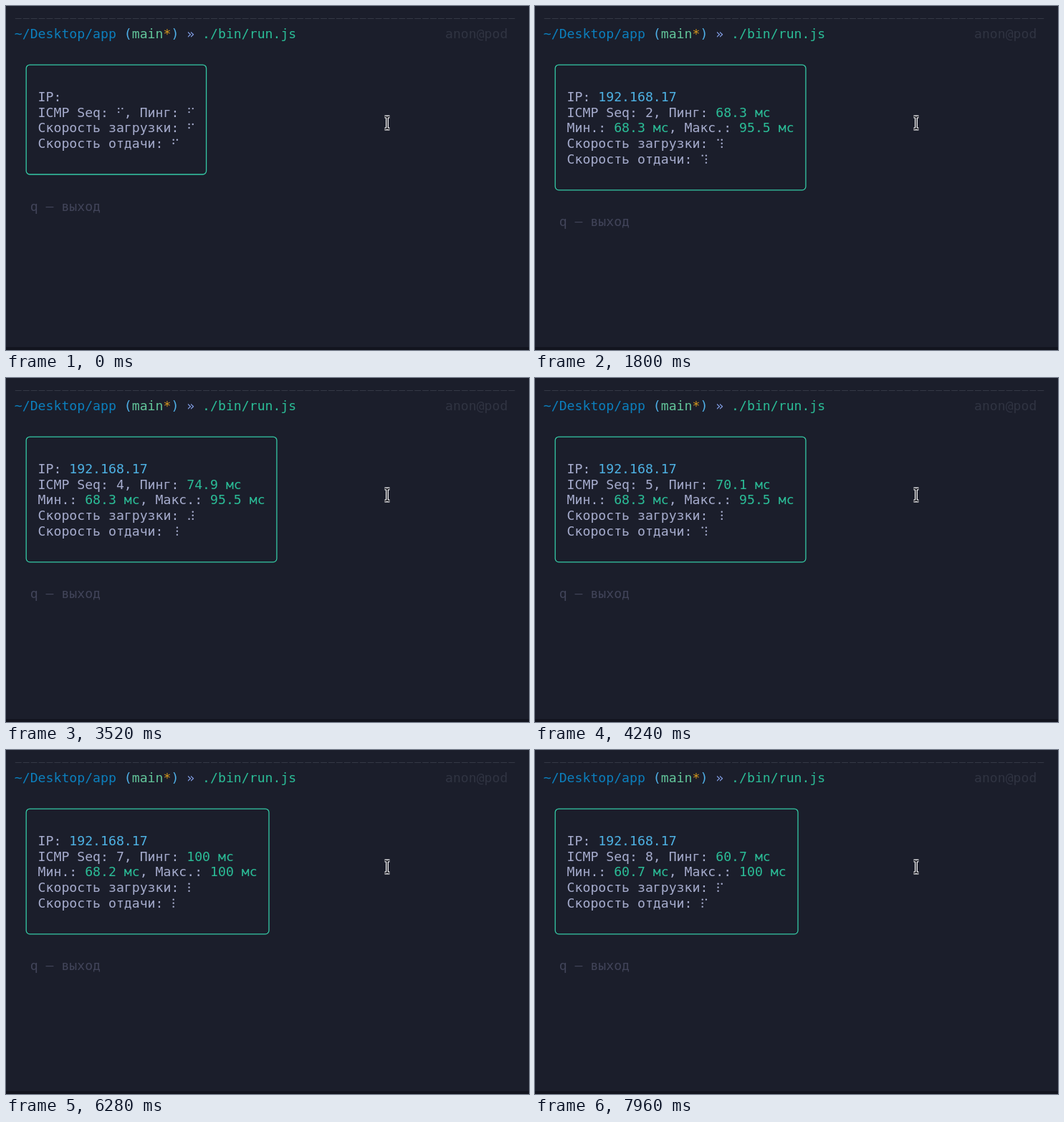
These frames come from a looping animation (730x480 px, 8000 ms). An HTML page with a canvas:

```html
<!DOCTYPE html>
<html lang="ru">
<head>
<meta charset="utf-8">
<title>Terminal network check</title>
<style>
  html, body { margin: 0; width: 100%; height: 100%; overflow: hidden; background: #1b1e2b; }
  canvas { display: block; }
</style>
</head>
<body>
<canvas id="stage" width="730" height="480"></canvas>
<script>
const ctx = document.getElementById('stage').getContext('2d');

const LOOP = 8000;
const CELL = 10.93, LINE = 21.85, LEFT = 11.8, TOP = 17.2;
const SPINNER = '⠋⠙⠹⠸⠼⠴⠦⠧⠇⠏';
const SPIN_STEP = 80;
const FIRST_PING = 200, PING_STEP = 1000, IP_TIME = 320;
const PINGS = [95.5, 68.3, 79.3, 74.9, 70.1, 68.2, 100, 60.7];

const COLOR = {
  bg: '#1b1e2b', edge: '#12141e', text: '#a6accd', green: '#2bbd97', border: '#35c9a5',
  path: '#0c7fbd', paren: '#4fb0e8', branch: '#62c59a', star: '#d6981c', arrow: '#7f9be0',
  ip: '#4eb2e4', dim: '#414459', faint: '#303442', rule: '#343845'
};

const colX = col => LEFT + col * CELL;
const rowY = row => TOP + row * LINE;

// Braille bits 0-2 are the left column, bits 3-5 the right one.
function drawBraille(char, x, y) {
  const bits = char.charCodeAt(0) - 0x2800;
  for (let i = 0; i < 6; i++) {
    if (!(bits >> i & 1)) continue;
    ctx.beginPath();
    ctx.arc(x + (i < 3 ? 3.3 : 8.5), y - 5.2 + (i % 3) * 5, 1.2, 0, Math.PI * 2);
    ctx.fill();
  }
}

// Writes [text, color] parts on the character grid.
function write(col, row, ...parts) {
  for (const [text, color = COLOR.text] of parts) {
    ctx.fillStyle = color;
    for (const char of text) {
      if (char >= '\u2800' && char <= '\u28ff') drawBraille(char, colX(col), rowY(row));
      else ctx.fillText(char, colX(col), rowY(row) + 6.2);
      col++;
    }
  }
}

function drawPrompt() {
  ctx.strokeStyle = COLOR.rule;
  ctx.lineWidth = 1.2;
  ctx.setLineDash([CELL - 2, 2]);
  ctx.beginPath();
  ctx.moveTo(colX(0) + 1, 17.5);
  ctx.lineTo(colX(64), 17.5);
  ctx.stroke();
  ctx.setLineDash([]);
  write(0, 1, ['~/Desktop/app ', COLOR.path], ['(', COLOR.paren], ['main', COLOR.branch],
    ['*', COLOR.star], [') ', COLOR.paren], ['» ', COLOR.arrow], ['./bin/run.js', COLOR.green]);
  write(55, 1, ['anon@pod', COLOR.faint]);
}

function drawBox(columns, rows) {
  ctx.strokeStyle = COLOR.border;
  ctx.lineWidth = 1.3;
  ctx.beginPath();
  ctx.roundRect(colX(1.5), rowY(3) - 0.7, (columns + 3) * CELL, (rows + 3) * LINE, 5);
  ctx.stroke();
}

function drawPointer(x, y) {
  ctx.beginPath();
  for (const side of [-1, 1]) {
    ctx.moveTo(x + side * 3.5, y - 8.5);
    ctx.lineTo(x + side, y - 8.5);
    ctx.lineTo(x, y - 7);
    ctx.lineTo(x, y + 7);
    ctx.lineTo(x + side, y + 8.5);
    ctx.lineTo(x + side * 3.5, y + 8.5);
  }
  for (const [color, width] of [['#f4f4f6', 4], ['#14151c', 1.4]]) {
    ctx.strokeStyle = color;
    ctx.lineWidth = width;
    ctx.stroke();
  }
}

const spinnerAt = time => SPINNER[Math.floor(time / SPIN_STEP) % SPINNER.length];
const ms = value => [value + ' мс', COLOR.green];

function statusLines(time) {
  const download = spinnerAt(time);
  const upload = spinnerAt(time < 2800 ? time : time - 40);
  const seq = time < FIRST_PING ? 0 : Math.floor((time - FIRST_PING) / PING_STEP) + 1;
  const seen = PINGS.slice(0, seq);
  const lines = [[['IP: '], [time < IP_TIME ? '' : '192.168.17', COLOR.ip]]];
  if (seq) {
    lines.push(
      [[`ICMP Seq: ${seq}, Пинг: `], ms(seen[seq - 1])],
      [['Мин.: '], ms(Math.min(...seen)), [', Макс.: '], ms(Math.max(...seen))]);
  } else {
    lines.push([[`ICMP Seq: ${download}, Пинг: ${download}`]]);
  }
  lines.push([['Скорость загрузки: ' + download]], [['Скорость отдачи: ' + upload]]);
  return lines;
}

function draw(now) {
  const lines = statusLines(now % LOOP);
  const columns = Math.max(...lines.map(parts => parts.map(part => part[0]).join('').length));

  ctx.fillStyle = COLOR.bg;
  ctx.fillRect(0, 0, 730, 480);
  ctx.fillStyle = COLOR.edge;
  ctx.fillRect(0, 476, 730, 4);
  ctx.font = '18.15px "DejaVu Sans Mono", monospace';

  drawPrompt();
  drawBox(columns, lines.length);
  lines.forEach((parts, i) => write(3, 5 + i, ...parts));
  write(2, lines.length + 8, ['q – выход', COLOR.dim]);
  drawPointer(532, 163);
  requestAnimationFrame(draw);
}
requestAnimationFrame(draw);
</script>
</body>
</html>
```
